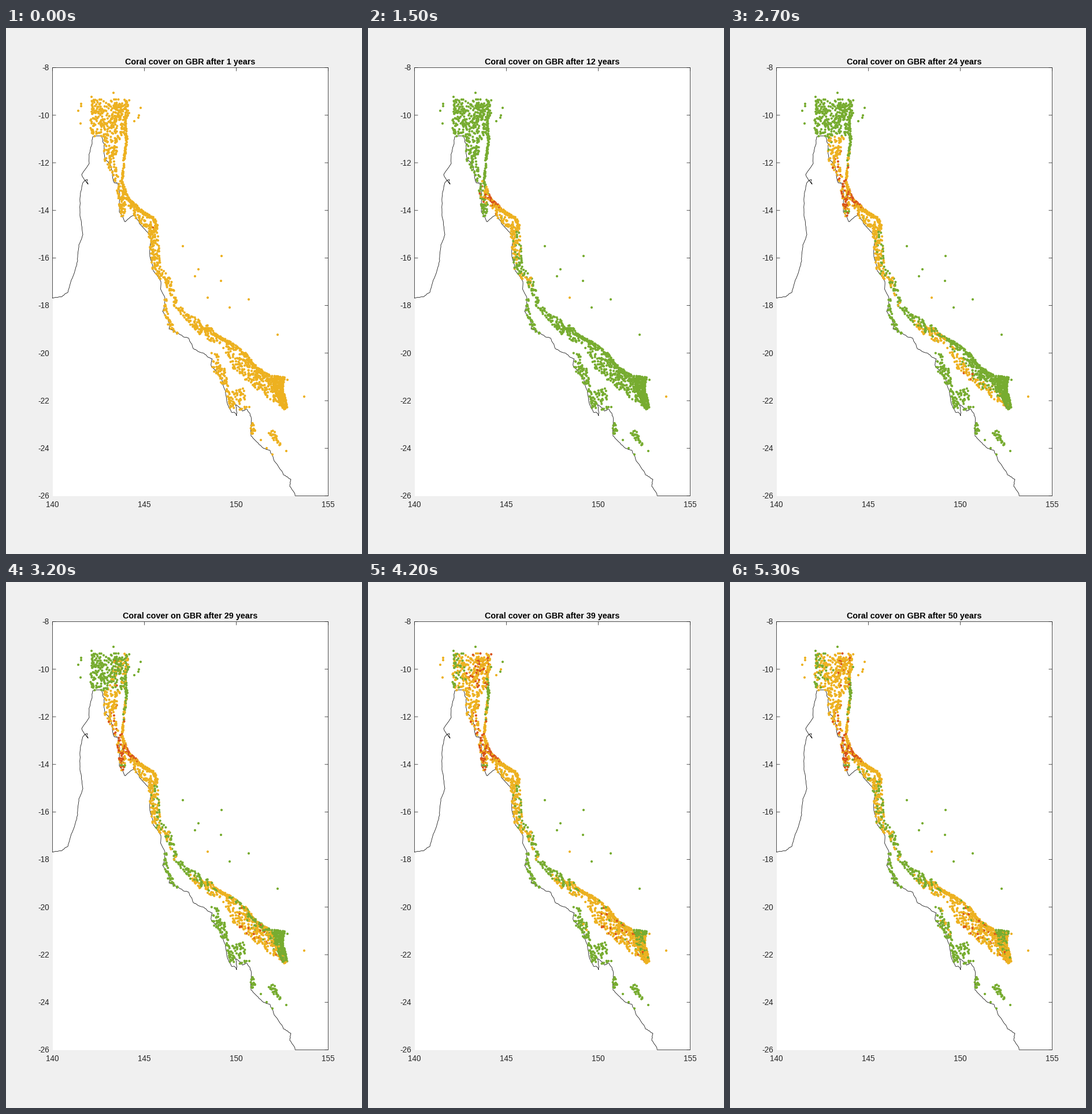
A matplotlib script that plays this animation: 616x909 px, repeating every 5400 ms.

```python
import numpy as np
import matplotlib.pyplot as plt
from matplotlib.animation import FuncAnimation

W, H, DPI = 616, 909, 64
PT = 72 / DPI
GREEN, ORANGE, RED = "#77AC30", "#EDB120", "#D95319"
INK = "#262626"
FRAMES, STEP, HOLD = 54, 100, 4   # the first year holds for some extra frames
rng = np.random.default_rng(7)

fig = plt.figure(figsize=(W / DPI, H / DPI), dpi=DPI, facecolor="#F0F0F0")
ax = fig.add_axes([0, 0, 1, 1])
ax.set_xlim(0, W)
ax.set_ylim(H, 0)
ax.axis("off")

# ---------------------------------------------------------------- axes box
L, R, T, B = 80.5, 557.5, 68.5, 808.5
ax.fill([L, R, R, L], [T, T, B, B], color="white", lw=0)


def stroke(x, y, color=INK, width=0.8):
    ax.plot(x, y, color=color, lw=width * PT, snap=False,
            solid_capstyle="butt")


def label(x, y, text, size=13.6, **kw):
    return ax.text(x, y, text, fontsize=size * PT, family="Liberation Sans",
                   va="baseline", **kw)


# the land hides the frame on the lower left
SHORE_Y, SHORE_X = 467, 500
stroke([SHORE_X, R, R, L, L], [B, B, T, T, SHORE_Y])

for lat in range(-8, -27, -2):
    y = T + (-8 - lat) * (B - T) / 18
    if y < SHORE_Y:
        stroke([L, L + 6], [y, y])
    stroke([R - 6, R], [y, y])
    label(75, y + 4.8, str(lat), ha="right", color=INK)
for lon in range(140, 156, 5):
    x = L + (lon - 140) * (R - L) / 15
    stroke([x, x], [T, T + 6])
    label(x, 828, str(lon), ha="center", color=INK)

title = label(318.8, 63.3, "", size=14.4, ha="center", color="black",
              weight="bold")

# --------------------------------------------------------------- coastline
WEST = [(80, 467), (97, 464), (107, 457), (116, 429), (124, 402), (126, 375),
        (133, 357), (128, 325), (128, 300), (132, 271), (141, 262), (142, 270),
        (131, 253), (144, 234), (148, 203), (150, 188), (165, 186)]
EAST = [(165, 186), (170, 201), (171, 225), (181, 237), (187, 267), (193, 268),
        (196, 318), (206, 335), (224, 322), (231, 338), (250, 358), (249, 395),
        (255, 420), (268, 438), (275, 466), (271, 490), (281, 503), (282, 520),
        (304, 531), (316, 536), (324, 554), (342, 562), (357, 572), (356, 586),
        (373, 606), (382, 645), (390, 664), (399, 670), (397, 651), (409, 662),
        (417, 659), (424, 672), (424, 705), (437, 718), (457, 730), (464, 748),
        (480, 772), (493, 780), (491, 792), (500, 808)]


def roughen(points, amp, levels=3):
    """Midpoint displacement gives the shore its fine teeth."""
    p = np.array(points, float)
    for _ in range(levels):
        mid = (p[1:] + p[:-1]) / 2 + rng.normal(0, amp, (len(p) - 1, 2))
        out = np.empty((2 * len(p) - 1, 2))
        out[::2], out[1::2] = p, mid
        p, amp = out, amp / 2
    return p


for shore, amp in ((WEST, 0.9), (EAST, 1.2)):
    stroke(*roughen(shore, amp).T, color="black", width=0.75)

# ------------------------------------------------------------------- reefs
pieces = []


def along(values, u):
    """Values spread evenly over 0..1, read at u."""
    values = np.atleast_1d(values).astype(float)
    return np.interp(u, np.linspace(0, 1, len(values)), values)


def curve(points, u):
    return np.column_stack([along(c, u) for c in zip(*points)])


def add(xy, onset, share, red=0, fade=0, heal=0):
    cols = np.broadcast_arrays(xy[:, 0], xy[:, 1], onset, share, red, fade, heal)
    pieces.append(np.column_stack(cols))


def band(inner, outer, density, onset=40, share=0, red=0,
         tilt=1, lag=0, fade=0, heal=0):
    """Scatter reefs between two edges, as many as the area asks for.

    onset, share, red: bleaching year, part of reefs hit and part killed,
    from one end to the other. tilt scales share across the band and lag
    delays onset towards the outer edge. fade and heal: late recovery.
    """
    u = np.linspace(0, 1, 201)
    a, b = curve(inner, u), curve(outer, u)
    d, w = np.diff((a + b) / 2, axis=0), (b - a)[1:]
    mass = abs(d[:, 0] * w[:, 1] - d[:, 1] * w[:, 0]) * along(density, u[1:])
    n = int(round(mass.sum()))
    s = (rng.choice(200, n, p=mass / mass.sum()) + rng.random(n)) / 200
    v = rng.random(n)
    xy = curve(inner, s) * (1 - v)[:, None] + curve(outer, s) * v[:, None]
    add(xy, along(onset, s) + lag * v, along(share, s) * along(tilt, v),
        along(red, s), fade, heal)


def ribbon(points, density, **kw):
    band([(x - 1.5, y + 1.5) for x, y in points],
         [(x + 1.5, y - 1.5) for x, y in points], density, **kw)


# northern head, from left to right, and its dense core
band([(145, 188), (172, 188), (206, 186)], [(148, 124), (180, 122), (214, 124)],
     .064, onset=(36, 33, 30, 30), share=(.3, .9, 1, 1),
     red=(0, .05, .25, .2), fade=.75)
band([(184, 128), (182, 158)], [(213, 126), (206, 158)],
     .07, onset=30, share=1, red=.45, fade=.6)

# inner reefs along the cape
band([(168, 188), (170, 228), (185, 254), (190, 270), (194, 300), (199, 328)],
     [(198, 188), (188, 228), (193, 254), (203, 272), (210, 300), (204, 328)],
     .085, onset=(24, 20, 17, 14, 13, 24), lag=-4,
     share=(1, 1, 1, 1, .95, .2), red=(.1, .12, .2, .45, .65, .1))

# outer ribbon
ribbon([(214, 143), (206, 160), (209, 195), (204, 230), (201, 268),
        (212, 296), (237, 319), (256, 330), (262, 345)],
       .3, onset=(30, 30, 30, 17, 14, 8, 7, 6, 6),
       share=(.95, .5, .1, .8, 1, 1, 1, 1, .9),
       red=(.1, 0, 0, 0, .1, .6, .05, 0, 0))

# bend, shelf and narrow middle
band([(212, 307), (228, 334), (246, 348), (249, 380), (252, 415),
      (268, 436), (282, 452), (290, 482), (310, 503), (338, 534)],
     [(218, 302), (240, 322), (262, 344), (265, 380), (267, 410),
      (286, 434), (290, 450), (298, 478), (320, 496), (352, 516)],
     .09, onset=(8, 8, 6, 10, 14, 10, 14, 22, 18, 16),
     share=(1, 1, 1, .85, .8, .75, .4, .25, .2, .7),
     red=(.2, 0, 0, 0, 0, 0, 0, 0, 0, 0), tilt=(1.1, .7), heal=.3)

# southern band, its rim and the far corner
band([(338, 534), (372, 548), (393, 588), (418, 613), (452, 638), (484, 660)],
     [(352, 516), (384, 540), (414, 564), (432, 586), (456, 601), (466, 612)],
     (.05, .06, .045, .09, .13, .13), onset=(14, 18, 19, 20, 21, 22), lag=10,
     share=(.8, .97, .97, .97, .97, .97), red=(0, .05, .1, .1, .1, .05))
ribbon([(338, 517), (384, 542), (411, 560), (432, 586), (456, 602)],
       .28, onset=(20, 28, 29, 29, 29), share=(.35, .95, .95, .95, .95))
band([(460, 601), (464, 628), (480, 660)], [(483, 603), (479, 626), (487, 656)],
     .28, onset=(38, 35, 29), share=(.05, .65, 1), red=(0, .02, .03))
ribbon([(481, 605), (477, 622), (486, 656)],
       .3, onset=(38, 36, 29), share=(.1, .7, 1))

# coastal reefs stay mostly healthy
band([(273, 462), (273, 490), (284, 524), (298, 529)],
     [(278, 462), (278, 488), (291, 518), (302, 531)], .09)
band([(354, 561), (358, 592), (378, 622), (388, 658)],
     [(364, 560), (378, 588), (386, 622), (398, 656)], .075,
     share=(.15, .15, 0, 0))
band([(391, 627), (404, 660)], [(412, 622), (419, 660)], .06)
band([(423, 683), (424, 702)], [(428, 682), (432, 700)], .18)
band([(453, 701), (474, 724)], [(463, 694), (477, 720)], .1)

# lone reefs: open sea, early victims, then those around the head
add(np.array([(306, 377), (373, 394), (333, 417), (327, 429), (372, 437),
              (420, 469), (387, 483), (470, 530), (421, 655), (485, 731),
              (461, 737), (451, 726), (441, 712), (186, 112), (148, 119)]),
    onset=40, share=0)
add(np.array([(349, 466), (516, 637)]), onset=8, share=1)
add(np.array([(125, 143), (130, 131), (130, 135), (129, 165), (233, 138),
              (230, 151), (229, 155), (222, 161), (487, 608)]),
    onset=35, share=1)

reef = np.vstack(pieces)
rng.shuffle(reef)
x, y, onset, share, red, fade, heal = reef.T
onset = np.clip(onset + rng.normal(0, 1.5, len(reef)), 4, None)
luck_hit, luck_dead = rng.random((2, len(reef)))


def ramp(t):
    return np.clip(t, 0, 1)


def colors(year):
    if year == 1:
        return np.full(len(reef), ORANGE)
    late = ramp((year - 39) / 10)
    hit = (year >= onset) & (luck_hit < share * (1 - heal * late))
    dead = hit & (luck_dead < red * ramp((year - onset) / 4) * (1 - fade * late))
    return np.where(dead, RED, np.where(hit, ORANGE, GREEN))


dots = ax.scatter(x, y, s=(4.1 * PT) ** 2, lw=0, zorder=4)
origin = ax.scatter([254], [343.5], s=(3 * PT) ** 2, c=RED, lw=0, zorder=5)


def draw(i):
    year = max(1, i - HOLD + 1)
    title.set_text(f"Coral cover on GBR after {year} years")
    dots.set_facecolor(colors(year))
    origin.set_visible(year < 8)
    return title, dots, origin


anim = FuncAnimation(fig, draw, frames=FRAMES, interval=STEP, repeat=True,
                     repeat_delay=0, blit=False)
plt.show()
```
